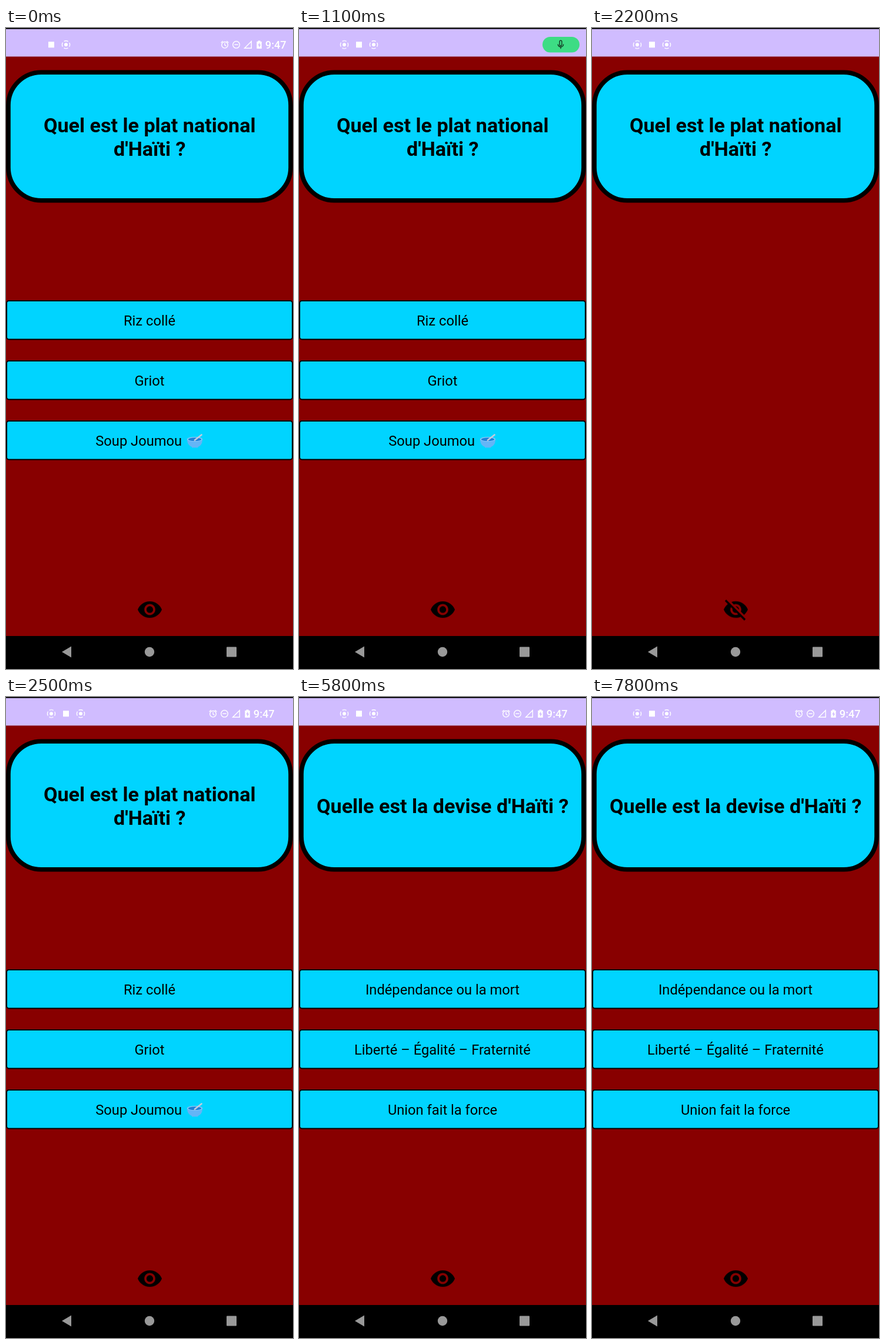
Write an HTML page that moves like this. It is 488 by 1088 pixels and loops after 8 s.

```html
<!DOCTYPE html>
<html lang="fr">
<head>
<meta charset="utf-8">
<title>Quiz</title>
<style>
  html, body { margin: 0; width: 100%; height: 100%; overflow: hidden; background: #880000; }
  svg { display: block; width: 488px; height: 1088px; }
  text { font-family: Roboto, sans-serif; text-anchor: middle; }
  .question { font-size: 34.1px; font-weight: 700; }
  .answer { font-size: 23.7px; }
  .start { text-anchor: start; }
  .clock { font-size: 18.2px; font-weight: 500; text-anchor: end; fill: #fff; }
  .line { fill: none; stroke: #fff; stroke-width: 1.4; }
  .box { fill: #00d4ff; stroke: #000; stroke-width: 2; }

  /* One shared 8 s cycle; hard switches use step-end */
  .answers, .eye, .eye-off, .marks, .first, .second { animation: 8s step-end infinite; }
  .answers, .eye { animation-name: shown; }
  .eye-off { animation-name: hidden; }
  .marks { animation-name: marked; }
  .first { animation-name: before; }
  .second { animation-name: after; }
  @keyframes shown { 0%, 30% { opacity: 1 } 18.75% { opacity: 0 } }
  @keyframes hidden { 0%, 30% { opacity: 0 } 18.75% { opacity: 1 } }
  @keyframes marked { 0%, 72.5% { opacity: 0 } 55% { opacity: 1 } }
  @keyframes before { 0% { opacity: 1 } 72.5%, 100% { opacity: 0 } }
  @keyframes after { 0% { opacity: 0 } 72.5%, 100% { opacity: 1 } }

  /* Status bar */
  .notices { animation: shift 8s infinite; }
  .notice-new { animation: appear 8s linear infinite; }
  .system { animation: system 8s linear infinite; }
  .chip { fill: #3ddc84; animation: chip 8s infinite; }
  .mic { animation: mic 8s linear infinite; }
  @keyframes shift {
    0%, 1.25% { transform: translateX(0) }
    5%, 100% { transform: translateX(25px) }
  }
  @keyframes appear { 0%, 2.5% { opacity: 0 } 6.25%, 100% { opacity: 1 } }
  @keyframes system {
    0%, 1% { opacity: 1; transform: translateX(0) }
    3.75% { opacity: 0; transform: translateX(0) }
    4%, 28.75% { opacity: 0; transform: translateX(-20px) }
    31.25%, 100% { opacity: 1; transform: translateX(-20px) }
  }
  @keyframes chip {
    0%, 5% { x: 465px; y: 22px; width: 12px; height: 12px; opacity: 0 }
    6.25% { x: 458px; y: 19px; width: 19px; height: 19px; opacity: 1 }
    11.5%, 24% { x: 414px; y: 15px; width: 63px; height: 26.5px; opacity: 1 }
    27% { x: 467px; y: 23px; width: 10px; height: 10px; opacity: 1 }
    27.5%, 100% { x: 471px; y: 26px; width: 4px; height: 4px; opacity: 0 }
  }
  @keyframes mic {
    0%, 8% { opacity: 0 }
    11.25%, 24% { opacity: 1 }
    25.5%, 100% { opacity: 0 }
  }
</style>
</head>
<body>
<svg viewBox="0 0 488 1088">
  <defs>
    <g id="record">
      <circle r="3" fill="#fff"/>
      <circle r="6.6" class="line" stroke-dasharray="7.4 2.97" stroke-dashoffset="3.7"/>
    </g>
    <rect id="box" class="box" x="1" width="486" height="65.5" rx="4"/>
  </defs>

  <rect width="488" height="1088" fill="#880000"/>

  <!-- Status bar -->
  <rect width="488" height="3" fill="#000"/>
  <rect y="1.8" width="488" height="46.7" fill="#d0bcff"/>
  <use href="#record" class="notice-new" x="77" y="28.3"/>
  <g class="notices">
    <rect x="72" y="23.3" width="10" height="10" fill="#fff"/>
    <use href="#record" x="102" y="28.3"/>
  </g>
  <g class="system">
    <g class="line">
      <circle cx="372" cy="28.8" r="5.3"/>
      <path d="M372 25.5v3.6l2.4 1.6M365.6 25l3.2-2.7M378.4 25l-3.2-2.7"/>
      <circle cx="391.5" cy="28.3" r="5.8"/>
      <path d="M388.3 28.3h6.4"/>
      <path d="M405.6 34.3h11.6V22.7z"/>
    </g>
    <path d="M428.5 21.5h4v1.6h2.2V35h-8.4V23.1h2.2z" fill="#fff"/>
    <path d="M431.3 24.5l-3 5h1.9v4l3-5.2h-1.9z" fill="#d0bcff"/>
    <text class="clock" x="476.7" y="35.3">9:47</text>
  </g>
  <rect class="chip" x="414" y="15" width="63" height="26.5" rx="13.2"/>
  <g class="mic" fill="none" stroke="#10281a" stroke-width="1.3">
    <rect x="443.1" y="21.2" width="3.8" height="9" rx="1.9"/>
    <path d="M440.3 27.5a4.7 4.7 0 0 0 9.4 0M445 32.3v3"/>
  </g>

  <!-- Question -->
  <rect x="4" y="75.2" width="480" height="217.6" rx="56" fill="#00d4ff" stroke="#000" stroke-width="7.6"/>
  <g class="question first">
    <text x="244.2" y="177">Quel est le plat national</text>
    <text x="244.2" y="217">d'Haïti ?</text>
  </g>
  <text class="question second" x="244.2" y="197">Quelle est la devise d'Haïti ?</text>

  <!-- Answers -->
  <g class="answers">
    <use href="#box" y="463"/>
    <use href="#box" y="565"/>
    <use href="#box" y="667"/>
    <g class="marks">
      <rect y="462" width="488" height="68" fill="#f00"/>
      <rect y="666" width="488" height="68" fill="#0f0"/>
    </g>
    <g class="answer first">
      <text x="244" y="505">Riz collé</text>
      <text x="244" y="607">Griot</text>
      <text class="start" x="152.3" y="709">Soup Joumou</text>
      <g>
        <path d="M308 698c0 8 4 11.5 8 13v1.2h10.5V711c4-1.500 7.500-5 7.500-13z" fill="#64b5f6"/>
        <ellipse cx="321" cy="698" rx="13" ry="4" fill="#90caf9"/>
        <ellipse cx="321" cy="698.2" rx="11.4" ry="2.9" fill="#1e80d8"/>
        <path d="M321 699.5L332.500 690.500" stroke="#c3cbdc" stroke-width="2.8" stroke-linecap="round"/>
      </g>
    </g>
    <g class="answer second">
      <text x="244" y="505">Indépendance ou la mort</text>
      <text x="244" y="607">Liberté – Égalité – Fraternité</text>
      <text x="244" y="709">Union fait la force</text>
    </g>
  </g>

  <!-- Visibility toggle -->
  <g transform="translate(222.1 964.7) scale(1.865)">
    <path class="eye" d="M12 4.5C7 4.5 2.73 7.61 1 12c1.73 4.39 6 7.5 11 7.5s9.27-3.11 11-7.5c-1.73-4.39-6-7.5-11-7.5zM12 17c-2.76 0-5-2.24-5-5s2.24-5 5-5 5 2.24 5 5-2.24 5-5 5zm0-8c-1.66 0-3 1.34-3 3s1.34 3 3 3 3-1.34 3-3-1.34-3-3-3z"/>
    <g class="eye-off">
      <path d="M12 7c2.76 0 5 2.24 5 5 0 .65-.13 1.26-.36 1.83l2.92 2.92c1.51-1.26 2.7-2.89 3.43-4.75-1.73-4.39-6-7.5-11-7.5-1.4 0-2.74.25-3.98.7l2.16 2.16C10.74 7.13 11.35 7 12 7z"/>
      <path d="M2 4.27l2.74 2.74C3.08 8.3 1.78 10.02 1 12c1.73 4.39 6 7.5 11 7.5 1.55 0 3.03-.3 4.38-.84L19.73 22 21 20.73 3.27 3zM7.53 9.8l1.55 1.55c-.05.21-.08.43-.08.65 0 1.66 1.34 3 3 3 .22 0 .44-.03.65-.08l1.55 1.55c-.67.33-1.41.53-2.2.53-2.76 0-5-2.24-5-5 0-.79.2-1.53.53-2.2z"/>
      <path d="M11.84 9.02l3.15 3.15.02-.16c0-1.66-1.34-3-3-3z"/>
    </g>
  </g>

  <!-- Navigation bar -->
  <rect y="1032" width="488" height="56" fill="#000"/>
  <g fill="#999">
    <path d="M95 1059l16-9.5v19z"/>
    <circle cx="244" cy="1059" r="8.2"/>
    <rect x="375" y="1050.5" width="17" height="17" rx="1"/>
  </g>
</svg>
</body>
</html>
```
